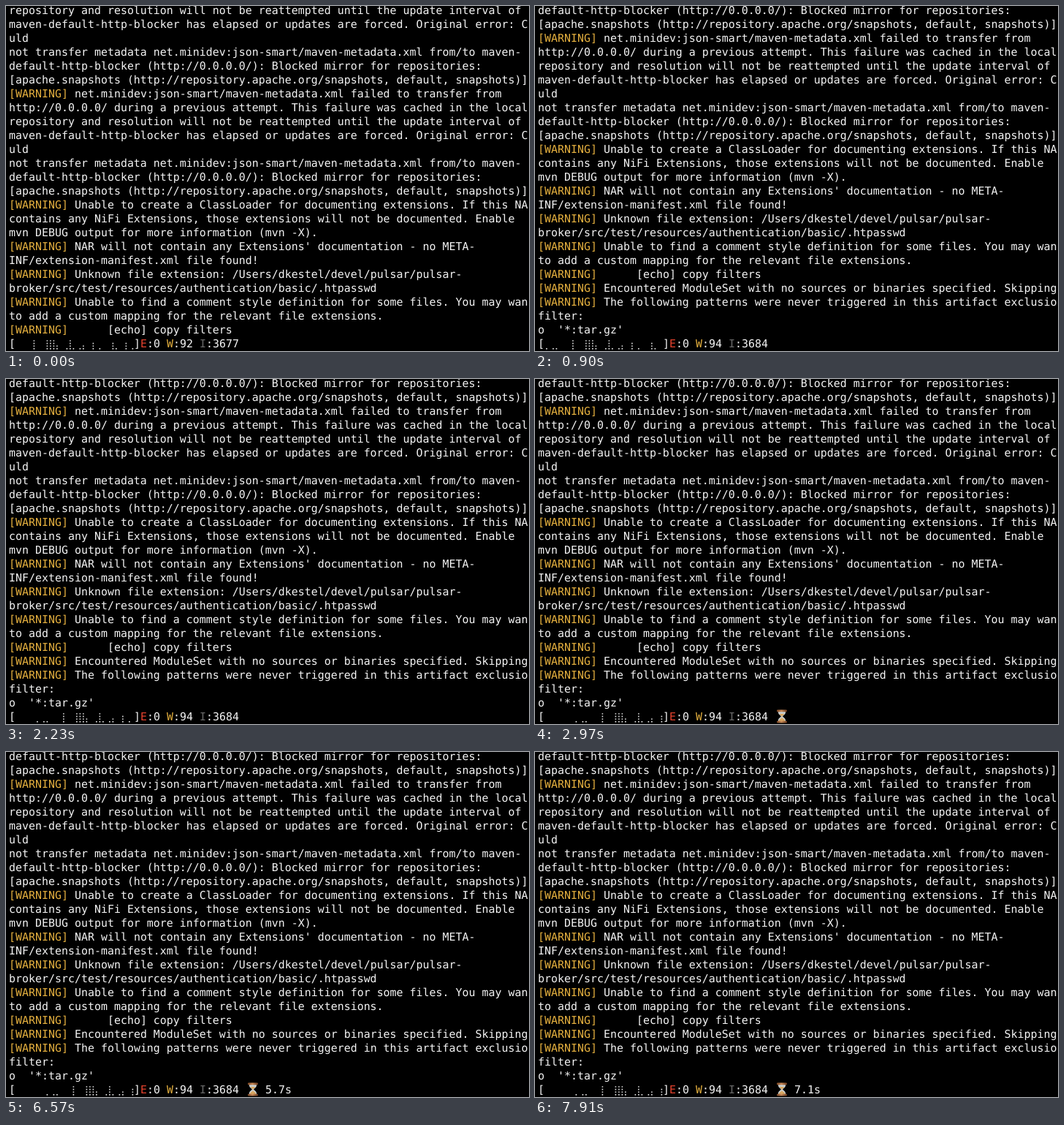
An HTML page for the animation above (8 s loop, 716 by 472 pixels).

```html
<!DOCTYPE html>
<html lang="en">
<head>
<meta charset="utf-8">
<title>Build log</title>
<style>
  html, body { margin: 0; width: 100%; height: 100%; overflow: hidden; background: #000; }
  svg { display: block; }
  text {
    font: 14.95px "DejaVu Sans Mono", "Noto Sans Mono", monospace;
    fill: #f4f4f4;
    white-space: pre;
    text-rendering: geometricPrecision;
    font-variant-ligatures: none;
  }
  .warn { fill: #e6b13f; }
  .err { fill: #e8432e; }
  .info { fill: #6a6a6a; }
</style>
</head>
<body>
<svg width="716" height="472" viewBox="0 0 716 472">
  <defs>
    <linearGradient id="wood" x1="0" x2="1" y1="0" y2="0">
      <stop offset="0" stop-color="#7a4524"/>
      <stop offset=".45" stop-color="#c98a58"/>
      <stop offset="1" stop-color="#6c3a1d"/>
    </linearGradient>
  </defs>
  <rect width="716" height="472" fill="#000"/>
  <g id="log"></g>
  <g id="status"></g>
  <path id="spark" fill="#dedede"/>
  <g id="glass">
    <path d="M332.8 455H343.2C343.2 459.5 339.3 460 339.3 461.5S343.2 463.5 343.2 468H332.8C332.8 463.5 336.7 463 336.7 461.5S332.8 459.5 332.8 455Z" fill="#c9d2d6"/>
    <path d="M334.6 458H341.4C340.6 460 338.6 460.4 338.3 462V464C340.4 464.6 342 466 342.2 468H333.8C334 466 335.6 464.6 337.7 464V462C337.4 460.4 335.4 460 334.6 458Z" fill="#d9a863"/>
    <rect x="331" y="452.6" width="14" height="2.8" rx="1.1" fill="url(#wood)"/>
    <rect x="331" y="467.8" width="14" height="2.8" rx="1.1" fill="url(#wood)"/>
  </g>
</svg>
<script>
const LOOP = 8000, LEFT = 4, CELL = 9, LINE = 19, BASE = 11, ROWS = 24;
const SCROLL = 300, LAST_INFO = 890, STALL = 2970, TIMER = 5970;

const blocker = [
  "repository and resolution will not be reattempted until the update interval of",
  "maven-default-http-blocker has elapsed or updates are forced. Original error: C",
  "uld",
  "not transfer metadata net.minidev:json-smart/maven-metadata.xml from/to maven-",
  "default-http-blocker (http://0.0.0.0/): Blocked mirror for repositories:",
  "[apache.snapshots (http://repository.apache.org/snapshots, default, snapshots)]"
];
const lines = [
  ...blocker,
  "[WARNING] net.minidev:json-smart/maven-metadata.xml failed to transfer from",
  "http://0.0.0.0/ during a previous attempt. This failure was cached in the local",
  ...blocker,
  "[WARNING] Unable to create a ClassLoader for documenting extensions. If this NA",
  "contains any NiFi Extensions, those extensions will not be documented. Enable",
  "mvn DEBUG output for more information (mvn -X).",
  "[WARNING] NAR will not contain any Extensions' documentation - no META-",
  "INF/extension-manifest.xml file found!",
  "[WARNING] Unknown file extension: /Users/dkestel/devel/pulsar/pulsar-",
  "broker/src/test/resources/authentication/basic/.htpasswd",
  "[WARNING] Unable to find a comment style definition for some files. You may wan",
  "to add a custom mapping for the relevant file extensions.",
  "[WARNING]      [echo] copy filters",
  "[WARNING] Encountered ModuleSet with no sources or binaries specified. Skipping",
  "[WARNING] The following patterns were never triggered in this artifact exclusio",
  "filter:",
  "o  '*:tar.gz'"
];

// Times at which the activity graph moves one dot column to the right.
const shifts = [300, 450, 750, 1040, 1190, 1490, 1790, 1930, 2230, 2530, 2680, 2970];
// [column at time zero, height in dots, time it appears]
const bars = [
  [-3, 1, LAST_INFO], [-1, 1, SCROLL], [0, 1, SCROLL],
  [5, 4], [9, 4], [10, 4], [11, 4], [12, 2],
  [15, 1], [16, 4], [17, 1], [19, 1], [20, 2],
  [23, 3], [25, 1], [29, 3], [30, 1], [33, 3], [35, 1]
];

const $ = id => document.getElementById(id);

function addText(parent, col, row, parts) {
  const el = document.createElementNS("http://www.w3.org/2000/svg", "text");
  el.setAttribute("x", LEFT + col * CELL);
  el.setAttribute("y", BASE + row * LINE);
  for (const [str, cls] of parts) {
    const span = document.createElementNS(el.namespaceURI, "tspan");
    span.textContent = str;
    if (cls) span.setAttribute("class", cls);
    el.append(span);
  }
  parent.append(el);
}

function drawLog(first) {
  $("log").replaceChildren();
  lines.slice(first, first + ROWS).forEach((line, row) => {
    const cut = line.startsWith("[WARNING]") ? 9 : 0;
    addText($("log"), 0, row, [[line.slice(0, cut), "warn"], [line.slice(cut)]]);
  });
}

function drawStatus(warnings, infos, elapsed) {
  const box = $("status");
  box.replaceChildren();
  addText(box, 0, ROWS, [["["]]);
  addText(box, 19, ROWS, [
    ["]"], ["E", "err"], [":0 "], ["W", "warn"], [":" + warnings + " "],
    ["I", "info"], [":" + infos]
  ]);
  if (elapsed) addText(box, 39, ROWS, [[elapsed]]);
}

function sparkPath(t) {
  const moved = shifts.filter(s => s <= t).length;
  let d = "";
  for (const [start, height, from = 0] of bars) {
    const k = start + moved;
    if (t < from || k < 0 || k > 35) continue;
    for (let i = 0; i < height; i++) {
      d += `M${15.1 + 4.5 * k} ${468.1 - 3.65 * i}h1.6v1.6h-1.6z`;
    }
  }
  return d;
}

// The timer is redrawn at a fixed rate, so it skips some tenths.
function elapsedAt(t) {
  if (t < TIMER) return "";
  const tick = 149.2;
  const shown = TIMER + Math.floor((t - TIMER) / tick) * tick;
  return (Math.floor((shown - 790) / 100) / 10).toFixed(1) + "s";
}

let lastFirst = -1, lastStatus = "";

function render(t) {
  const scrolled = t >= SCROLL;
  const first = scrolled ? 4 : 0;
  if (first !== lastFirst) drawLog(lastFirst = first);

  const status = [scrolled ? 94 : 92, t >= LAST_INFO ? 3684 : scrolled ? 3683 : 3677, elapsedAt(t)];
  if (status.join() !== lastStatus) {
    lastStatus = status.join();
    drawStatus(...status);
  }
  $("spark").setAttribute("d", sparkPath(t));
  $("glass").setAttribute("visibility", t >= STALL ? "visible" : "hidden");
}

const begin = performance.now();
function frame() {
  render((performance.now() - begin) % LOOP);
  requestAnimationFrame(frame);
}
frame();
</script>
</body>
</html>
```
